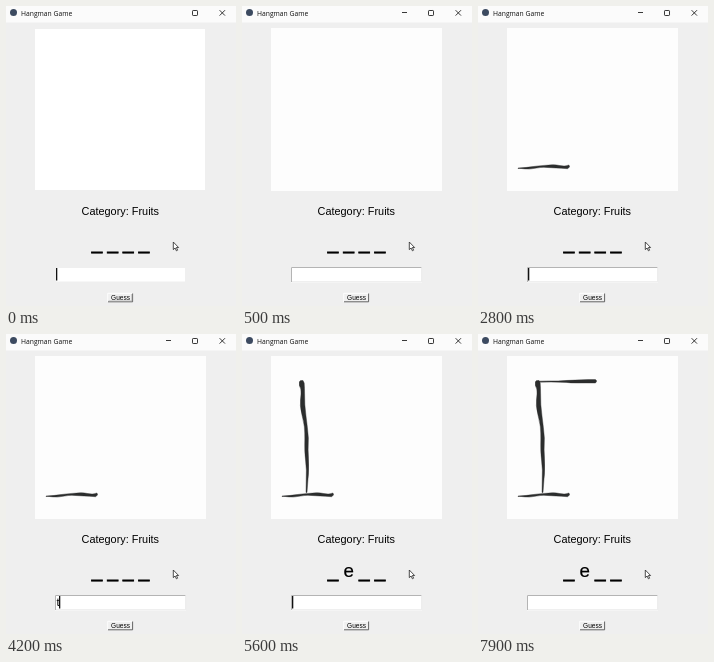
Animation, 230 px wide and 300 px high, one loop 8000 ms. Source, as an HTML page:

```html
<!DOCTYPE html>
<html lang="en">
<head>
<meta charset="utf-8">
<title>Hangman Game</title>
<style>
  html, body { margin: 0; width: 100%; height: 100%; overflow: hidden; background: #f0f0f0; }
  svg { display: block; width: 100vw; height: 100vh; }
  text { font-family: "Liberation Sans", Arial, sans-serif; fill: #000; white-space: pre; }
  .title { font: 6.75px "Open Sans", sans-serif; fill: #111; }
  .category { font-size: 10.9px; }
  .word { font-size: 18.8px; stroke: #000; stroke-width: .8px; }
  .letter { stroke-width: .2px; }
  .typed { font-size: 11px; }
  .label { font-size: 6.5px; }
  .ink { fill: #2b2d2d; stroke: #2b2d2d; stroke-width: .4; stroke-linejoin: round; }
  .line { fill: none; stroke: #222; stroke-width: .9; }

  .timed { opacity: 0; animation: 8s step-end infinite; }
  .opening { animation-name: opening; }
  .settled { animation-name: settled; }
  .base { animation-name: base; }
  .post { animation-name: post; }
  .beam { animation-name: beam; }
  .hidden-word { animation-name: hidden-word; }
  .shown-word { animation-name: shown-word; }
  .guess-1 { animation-name: guess-1; }
  .guess-2 { animation-name: guess-2; }
  .guess-3 { animation-name: guess-3; }
  .guess-4 { animation-name: guess-4; }
  .caret { animation-name: caret; }

  @keyframes opening { 0% { opacity: 1 } 1.25%, 100% { opacity: 0 } }
  @keyframes settled { 0% { opacity: 0 } 1.25%, 100% { opacity: 1 } }
  @keyframes base { 0% { opacity: 0 } 35%, 100% { opacity: 1 } }
  @keyframes post { 0% { opacity: 0 } 53.75%, 100% { opacity: 1 } }
  @keyframes beam { 0% { opacity: 0 } 87.5%, 100% { opacity: 1 } }
  @keyframes hidden-word { 0% { opacity: 1 } 63.75%, 100% { opacity: 0 } }
  @keyframes shown-word { 0% { opacity: 0 } 63.75%, 100% { opacity: 1 } }
  @keyframes guess-1 { 0% { opacity: 0 } 23.75% { opacity: 1 } 35% { opacity: 0 } }
  @keyframes guess-2 { 0% { opacity: 0 } 50% { opacity: 1 } 53.75% { opacity: 0 } }
  @keyframes guess-3 { 0% { opacity: 0 } 57.5% { opacity: 1 } 63.75% { opacity: 0 } }
  @keyframes guess-4 { 0% { opacity: 0 } 82.5% { opacity: 1 } 87.5% { opacity: 0 } }
  @keyframes caret {
    0% { opacity: 1; transform: translateX(0) }
    3.75% { opacity: 0; transform: translateX(0) }
    23.75% { opacity: 1; transform: translateX(6px) }
    35% { opacity: 1; transform: translateX(0) }
    45% { opacity: 0; transform: translateX(0) }
    50% { opacity: 1; transform: translateX(3px) }
    53.75% { opacity: 1; transform: translateX(0) }
    57.5% { opacity: 1; transform: translateX(6px) }
    63.75% { opacity: 1; transform: translateX(0) }
    82.5% { opacity: 1; transform: translateX(6px) }
    87.5% { opacity: 1; transform: translateX(0) }
    93.75%, 100% { opacity: 0; transform: translateX(0) }
  }
</style>
</head>
<body>
<svg viewBox="0 0 230 300">
  <rect width="230" height="300" fill="#efefef"/>

  <!-- title bar -->
  <rect width="230" height="16.5" fill="#fbfbfb"/>
  <circle cx="7.5" cy="6.5" r="3.5" fill="#3c4a60"/>
  <text class="title" x="15" y="9.6">Hangman Game</text>
  <path class="line timed settled" d="M160 6.5h5"/>
  <rect class="line" x="186.5" y="4.5" width="5" height="5" rx=".7"/>
  <path class="line" d="M213.6 4.2l5.4 5.4m0-5.4l-5.4 5.4"/>

  <!-- drawing area -->
  <rect x="29" y="23" width="170" height="161" fill="#fff"/>
  <rect class="timed settled" x="29" y="22" width="171" height="163" fill="#fdfdfd"/>
  <g class="ink">
    <path class="timed base" d="M40 162Q49 161.6 55 160.6T66 159.4T74 158.8T82 159.6T91 159L91.6 161L89.5 162.7Q83 162.3 78 162T68 161.4T57 162.3T47 162.9T40 162.5Z"/>
    <path class="timed post" d="M58.5 46.6L61 46.5L62.2 49Q62.6 54 62.6 60Q62.4 70 64 82T66.4 104Q65.8 116 66.6 126Q67.2 137 66 145L65 158.5L64 158.5L64.2 146Q64.8 136 63.6 127T62.8 105T60.2 82T59 60Q59.4 54 57.2 51.5L57.2 48Z"/>
    <path class="timed beam" d="M60 47.2Q70 46.8 80 46.9Q90 46.4 97 46.1T110 45.6L117.5 45.6L118.8 47L117.5 49Q107 48.9 100 49T88 48.4Q78 47.8 60 48.2Z"/>
  </g>

  <text class="category" x="114.3" y="209" text-anchor="middle">Category: Fruits</text>
  <g class="word" text-anchor="middle">
    <text class="timed hidden-word" x="114.5" y="243.1">_ _ _ _</text>
    <text class="timed shown-word" x="114.5" y="243.1">_ <tspan class="letter">e</tspan> _ _</text>
  </g>

  <!-- entry -->
  <rect x="50" y="262" width="129" height="13.5" fill="#fff"/>
  <g class="timed settled">
    <rect x="49" y="261" width="131" height="15.5" fill="#fff"/>
    <path d="M49.5 276V261.5H179.5" fill="none" stroke="#b4b4b4"/>
    <path d="M50 275.7H179.6V262" fill="none" stroke="#e3e3e3" stroke-width=".7"/>
  </g>
  <g class="typed">
    <text class="timed guess-1" x="50.5" y="272">a</text>
    <text class="timed guess-2" x="50.5" y="272">t</text>
    <text class="timed guess-3" x="50.5" y="272">e</text>
    <text class="timed guess-4" x="50.5" y="272">o</text>
  </g>
  <rect class="timed caret" x="50" y="262" width="1.3" height="12.5" fill="#111"/>

  <!-- button -->
  <rect x="101.5" y="287" width="25.5" height="9" fill="#f0f0f0"/>
  <path d="M101.7 296V287.3H126.5" fill="none" stroke="#fff" stroke-width=".9"/>
  <path d="M102 295.8H126.6V287.5" fill="none" stroke="#555" stroke-width=".9"/>
  <path class="timed opening" d="M102.5 295H125.8V288" fill="none" stroke="#aaa" stroke-width=".7"/>
  <text class="label" x="114.5" y="294" text-anchor="middle">Guess</text>

  <!-- pointer -->
  <path d="M167.3 236V243.6L169.1 242L170.4 244.8L171.6 244.2L170.4 241.5H172.6Z" fill="#fff" stroke="#222" stroke-width=".8"/>
</svg>
</body>
</html>
```
